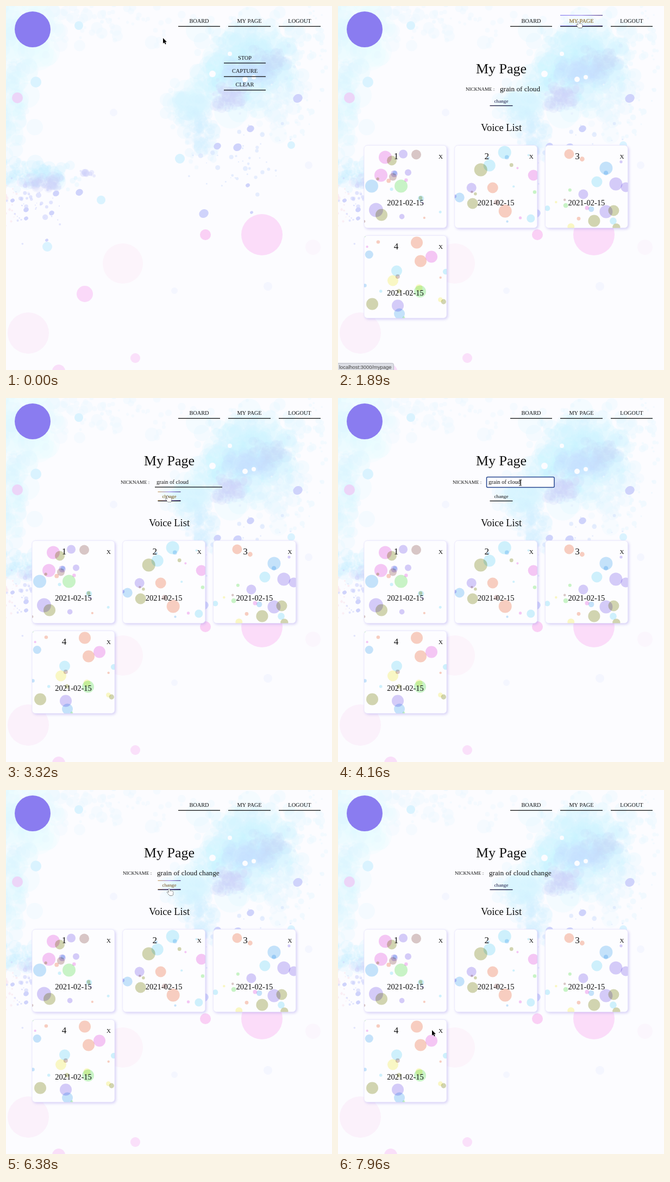
Animation of 600 by 670 pixels, one loop 7.99 s. Source, as an HTML page with a canvas:

```html
<!DOCTYPE html>
<html>
<head>
<meta charset="utf-8">
<style>
  html, body { margin: 0; width: 600px; height: 670px; overflow: hidden; background: #fcfcff; }
  canvas { display: block; }
</style>
</head>
<body>
<canvas id="stage" width="600" height="670"></canvas>
<script>
const LOOP = 7990, TAU = Math.PI * 2;
const NAME = 'grain of cloud', ADDED = ' change';
const SERIF = '"Liberation Serif", serif', SANS = '"Liberation Sans", sans-serif';
const BASE = '#fcfcff', CYAN = '#c8f0ff', PERI = '#cfd3fb', PALE = '#ecf8ff', INK = '#111';
const stage = document.getElementById('stage');
let g = stage.getContext('2d');

let seed = 7;
const rand = () => (seed = (seed * 16807) % 2147483647) / 2147483647;
const spread = () => rand() + rand() + rand() - 1.5;
const clamp = v => Math.max(0, Math.min(1, v));
const ease = v => v * v * (3 - 2 * v);
const within = (t, a, b) => t >= a && t < b;
const fade = (t, a, b) => clamp((t - a) / 150) - clamp((t - b) / 150);

function dot(x, y, r, color) {
  g.fillStyle = color;
  g.beginPath();
  g.arc(x, y, r, 0, TAU);
  g.fill();
}
function line(x1, x2, y, color = INK, width = 1.3) {
  g.fillStyle = color;
  g.fillRect(x1, y - width / 2, x2 - x1, width);
}
function text(str, x, y, size, align = 'center', color = INK, family = SERIF) {
  g.font = size + 'px ' + family;
  g.textAlign = align;
  g.fillStyle = color;
  g.fillText(str, x, y);
}

// Watercolour: many translucent blobs scattered round a centre
function splash(x, y, w, h, count, size, color, alpha = .2) {
  g.globalAlpha = alpha;
  for (let i = 0; i < count; i++)
    dot(x + spread() * w, y + spread() * h, size * (.15 + rand() * rand()), color);
  g.globalAlpha = 1;
}

function paintBackdrop() {
  const layer = document.createElement('canvas');
  layer.width = 600;
  layer.height = 670;
  const main = g;
  g = layer.getContext('2d');
  g.fillStyle = BASE;
  g.fillRect(0, 0, 600, 670);

  // left wash
  splash(20, 40, 90, 70, 130, 34, '#e2f8ff', .22);
  splash(5, 170, 40, 130, 120, 24, '#dcf5ff', .22);
  splash(190, 20, 130, 50, 80, 14, PALE, .4);
  splash(50, 312, 75, 22, 120, 18, CYAN);
  splash(68, 326, 40, 14, 60, 13, PERI);
  splash(150, 307, 13, 7, 14, 9, PERI, .4);
  splash(45, 370, 60, 50, 45, 5, PERI, .6);
  splash(5, 360, 14, 50, 30, 4, '#f8e4ec', .6);

  // right wash
  splash(445, 115, 85, 70, 240, 34, CYAN, .16);
  splash(335, 185, 38, 36, 90, 24, '#d6f4ff');
  splash(360, 240, 28, 50, 80, 18, '#d2f2ff');
  splash(500, 155, 60, 75, 90, 16, '#dff6ff');
  splash(440, 60, 80, 40, 90, 18, '#d8f5ff');
  splash(455, 120, 50, 22, 80, 20, '#c8dffc', .16);
  splash(412, 168, 30, 24, 80, 16, PERI, .18);
  splash(490, 105, 35, 25, 60, 14, '#c6dcfc');
  splash(430, 280, 80, 70, 45, 5, '#d5e2fd', .6);
  splash(520, 200, 60, 70, 40, 7, PALE, .7);
  splash(570, 60, 40, 70, 40, 10, PALE, .6);
  for (const [x, y, r] of [[380, 125, 6], [440, 135, 5], [456, 131, 4], [412, 88, 4]])
    dot(x, y, r, BASE);

  const drops = [
    [364, 382, 9], [426, 260, 8], [389, 258, 7], [450, 226, 7], [537, 170, 9],
    [135, 343, 7], [92, 345, 6], [37, 375, 5], [37, 391, 4], [84, 381, 5],
    [75, 431, 3], [452, 380, 3], [445, 330, 4], [12, 358, 4]
  ];
  for (const [x, y, r] of drops) {
    g.fillStyle = PERI;
    g.beginPath();
    g.ellipse(x, y, r, r * .85, -.5, 0, TAU);
    g.fill();
  }
  const faint = [[320, 281, 9], [175, 357, 8], [76, 443, 9], [525, 256, 7], [55, 140, 10],
    [134, 36, 8], [557, 293, 7], [310, 524, 6], [482, 516, 8], [198, 196, 7]];
  faint.forEach(([x, y, r], i) => dot(x, y, r, i < 6 ? '#daf3ff' : '#f4f6ff'));

  const discs = [
    [471, 421, 38, '#fbdcf9'], [367, 421, 10, '#fad0f5'], [145, 530, 15, '#fad9f9'],
    [21, 169, 10, '#ecd5f8'], [215, 474, 37, '#fcf4fb'], [41, 602, 38, '#fbf1fb'],
    [238, 648, 9, '#fae0fa'], [97, 672, 12, '#f9dff9'], [565, 444, 14, '#fbf6fd']
  ];
  for (const d of discs) dot(...d);

  dot(49, 43, 33, '#8a7cf0');
  g = main;
  return layer;
}

const TINTS = ['#f6c8f4', '#c6e4fa', '#caf5c6', '#d3d6b0', '#d6cdf8', '#f9cfc0', '#dac8c6', '#fbf9c4', '#d0f2fc'];
// Each card: x, y, radius, tint, measured from its corner
const CARDS = [
  [[39, 22, 12, 0], [51, 28, 9, 3], [72, 16, 8, 4], [96, 17, 9, 6], [31, 55, 12, 0],
   [53, 58, 7, 6], [68, 75, 12, 2], [14, 75, 12, 1], [32, 128, 11, 3], [22, 119, 13, 4]],
  [[92, 13, 12, 8], [48, 45, 12, 3], [64, 37, 11, 8], [70, 78, 10, 5], [31, 78, 9, 4],
   [33, 107, 10, 3], [93, 121, 12, 5], [145, 55, 10, 0], [9, 96, 9, 1]],
  [[44, 16, 9, 5], [112, 42, 12, 1], [95, 67, 10, 8], [130, 71, 12, 4], [70, 90, 9, 4],
   [126, 120, 10, 3], [112, 122, 12, 4], [90, 139, 11, 3], [148, 77, 9, 4]],
  [[97, 13, 11, 5], [104, 47, 11, 5], [124, 39, 11, 0], [60, 65, 10, 8], [53, 83, 10, 7],
   [103, 103, 11, 2], [15, 126, 11, 3], [62, 129, 11, 4], [65, 144, 10, 1]]
];
const crumbs = CARDS.map(() => Array.from({ length: 14 }, () =>
  [rand() * 152, rand() * 152, 2 + rand() * rand() * 7, Math.floor(rand() * 9)]));

function card(i, shift) {
  const x = 48 + (i % 3) * 166.7, y = (i < 3 ? 256.5 : 422.5) + shift;
  g.save();
  g.translate(x, y);
  g.beginPath();
  g.roundRect(0, 0, 152, 152, 6);
  g.save();
  g.shadowColor = 'rgba(160,145,235,.45)';
  g.shadowBlur = 5;
  g.shadowOffsetX = g.shadowOffsetY = 2;
  g.fillStyle = '#fdfdff';
  g.fill();
  g.restore();
  g.strokeStyle = '#e9e6fb';
  g.lineWidth = .8;
  g.stroke();
  g.clip();
  g.globalCompositeOperation = 'multiply';
  for (const [cx, cy, r, tint] of [...CARDS[i], ...crumbs[i]]) dot(cx, cy, r, TINTS[tint]);
  g.restore();
  text(i + 1, x + 59, y + 25, 17);
  text('X', x + 141, y + 24, 11);
  text('2021-02-15', x + 76, y + 110, 14.5);
}

function button(label, x, y, width, size, hover = 0, ink = INK) {
  const left = x - width / 2, right = x + width / 2, rise = width > 60 ? 20 : 16.5;
  text(label, x, y - (width > 60 ? 6.5 : 5.5), size, 'center', ink);
  line(left, right, y, ink);
  if (!hover) return;
  g.globalAlpha = hover;
  g.save();
  g.globalAlpha = hover * .9;
  text(label, x, y - (width > 60 ? 6.5 : 5.5), size, 'center', '#dcb968');
  g.restore();
  const shade = g.createLinearGradient(left, 0, right, 0);
  shade.addColorStop(0, width > 60 ? '#8a84f2' : '#c9a66a');
  shade.addColorStop(.5, '#a291ec');
  shade.addColorStop(1, '#55458c');
  line(left, right, y - rise - .3, shade);
  line(left, right, y - 1, shade, 1);
  g.globalAlpha = 1;
}

// Pointer path: time, x, y of the tip
const PATH = [
  [0, 289, 59], [150, 289, 59], [850, 441, 28], [2650, 441, 28], [3080, 296, 179], [3450, 296, 179],
  [3800, 335, 156], [5300, 335, 156], [5900, 299, 181.5], [6750, 299, 181.5], [7700, 173, 442], [LOOP, 173, 442]
];
function pointerAt(t) {
  const i = PATH.findIndex(p => p[0] > t);
  const [t0, x0, y0] = PATH[i - 1], [t1, x1, y1] = PATH[i];
  const k = ease((t - t0) / (t1 - t0));
  return [x0 + (x1 - x0) * k, y0 + (y1 - y0) * k];
}

const ARROW = new Path2D('M0 0V10L2.3 7.9 4 11.6 5.6 10.9 4 7.3H7Z');
const HAND = new Path2D('M0 1Q1-.6 2 1L3.2 5Q4.6 3.6 5.2 5 6.4 3.9 7 5.3 8.5 4.6 8.7 6.4L8.6 9.3 7.6 12.5H2L-.8 9-2.5 7Q-2.8 5.5-1.2 6L.8 7.4Z');

function pointer(t, hand, beam) {
  g.save();
  g.translate(...pointerAt(t));
  if (beam) {
    g.fillStyle = '#333';
    g.fillRect(0, -5, 1, 10);
    g.fillRect(-2, -5.5, 5, 1);
    g.fillRect(-2, 4.5, 5, 1);
  } else {
    const shape = hand ? HAND : ARROW;
    g.lineWidth = 1;
    g.strokeStyle = hand ? '#222' : '#fff';
    g.fillStyle = hand ? '#fff' : '#000';
    g.stroke(shape);
    g.fill(shape);
  }
  g.restore();
}

function nickname(t, editing) {
  if (!editing) {
    const changed = t > 6000, x = changed ? 215 : 235;
    text('NICKNAME :', x, 155.5, 9, 'left');
    text(changed ? NAME + ADDED : NAME, x + 63, 157, 13.2, 'left');
    return;
  }
  text('NICKNAME :', 211, 158, 9, 'left');
  const focused = within(t, 3850, 6050);
  if (focused) {
    g.beginPath();
    g.roundRect(273.5, 145.5, 124.5, 19, 2);
    g.fillStyle = '#fdfdff';
    g.fill();
    g.strokeStyle = '#25458f';
    g.lineWidth = 1.5;
    g.stroke();
  } else line(274, 398, 164);
  const typed = NAME + ADDED.slice(0, Math.floor(clamp((t - 4250) / 900) * ADDED.length));
  text(typed, 277, 158, 10.5, 'left');
  if (focused && (t - 3850) % 1000 < 550 || within(t, 4250, 5350)) {
    g.fillStyle = '#444';
    g.fillRect(277.5 + g.measureText(typed).width, 149.5, .8, 10.5);
  }
}

function draw(t) {
  const overNav = fade(t, 760, 2700), overChange = fade(t, 2980, 3520) + fade(t, 5800, 6880);
  g.drawImage(backdrop, 0, 0);
  button('BOARD', 355.5, 37.5, 77, 10.3);
  button('MY PAGE', 448, 37.5, 78, 10.3, overNav);
  button('LOGOUT', 540.5, 37.5, 77, 10.3);

  if (t < 1450) {
    ['STOP', 'CAPTURE', 'CLEAR'].forEach((label, i) => button(label, 439.5, 105 + i * 24.9, 77, 10.3));
  } else {
    const editing = within(t, 3200, 6150), shift = editing ? 6 : 0;
    text('My Page', 300.5, 123.5, 26);
    nickname(t, editing);
    button('change', 300.5, 183.5 + shift, 42, 9.2, overChange, editing ? INK : '#17173f');
    text('Voice List', 300.5, 230 + shift, 18.5);
    CARDS.forEach((_, i) => card(i, shift));
  }

  const status = fade(t, 950, 2450);
  if (status) {
    g.globalAlpha = status;
    g.beginPath();
    g.roundRect(-2, 657.5, 104.5, 15, 3);
    g.fillStyle = '#dcdee5';
    g.fill();
    g.strokeStyle = '#b9bbc4';
    g.lineWidth = 1;
    g.stroke();
    text('localhost:3000/mypage', 2, 667.5, 9.4, 'left', '#444', SANS);
    g.globalAlpha = 1;
  }
  if (!within(t, 4250, 5350)) pointer(t, overNav > .3 || overChange > .3, within(t, 3650, 5500));
}

const backdrop = paintBackdrop();
function tick() {
  draw(performance.now() % LOOP);
  requestAnimationFrame(tick);
}
tick();
</script>
</body>
</html>
```
